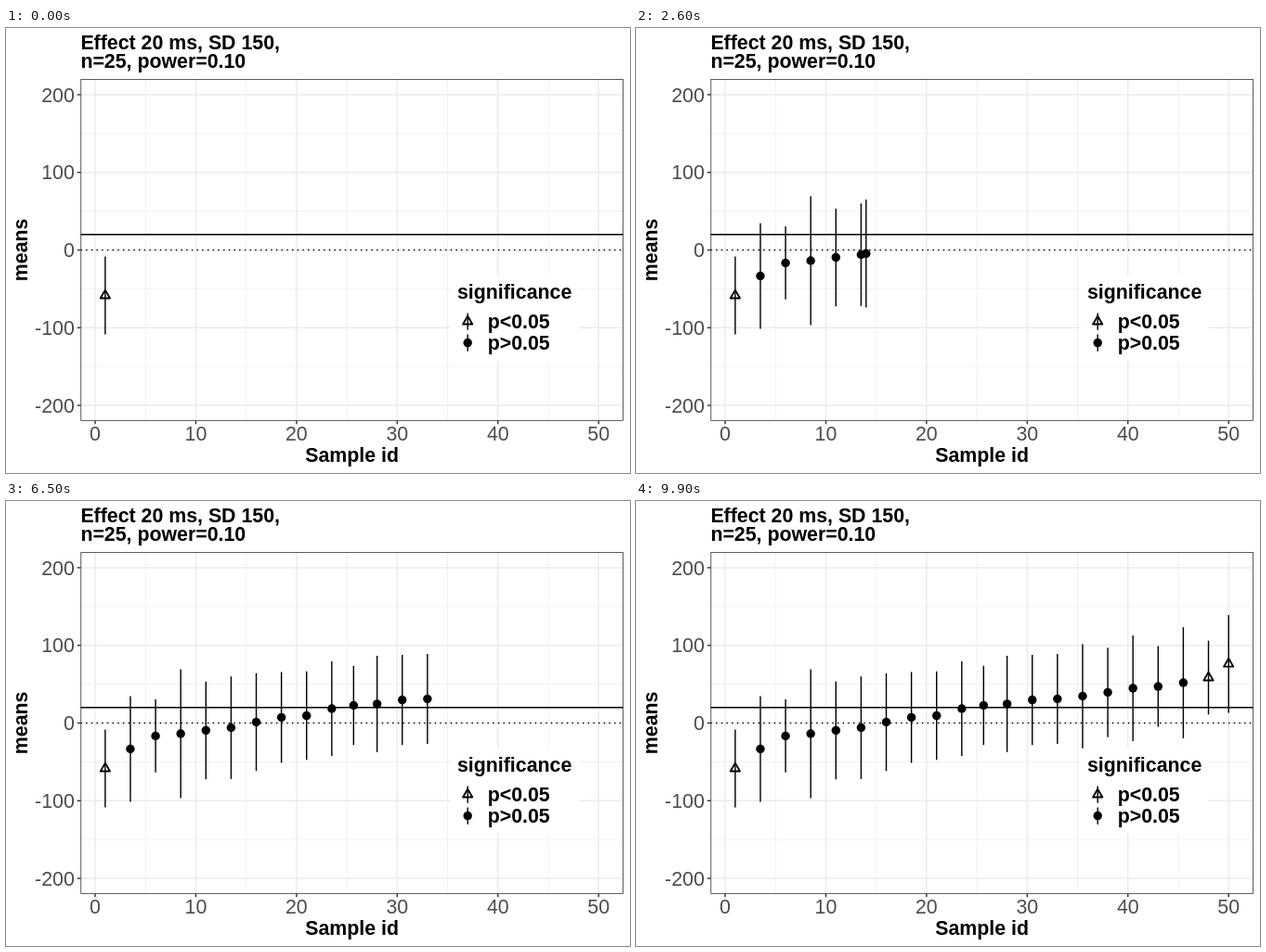
Recreate the animation shown at these times as an HTML page. Size 672 px wide and 480 px high, loop 10000 ms.

```html
<!DOCTYPE html>
<html lang="en">
<head>
<meta charset="utf-8">
<title>Sample means</title>
<style>
html, body { margin: 0; width: 672px; height: 480px; overflow: hidden; background: #fff; }
svg { display: block; }
text { font: 21.33px "Liberation Sans", Arial, sans-serif; fill: #4d4d4d; }
.b { font-weight: bold; fill: #000; }
.mark { stroke: #000; stroke-width: 1.42; }
.tri { fill: none; stroke: #000; stroke-width: 1.89; stroke-linejoin: round; }
</style>
</head>
<body>
<svg width="672" height="480" viewBox="0 0 672 480">
  <g id="axes"></g>
  <g id="marks"></g>
  <g id="legend"></g>
</svg>
<script>
const L = 80.4, R = 664.9, T = 55.1, B = 423.7;
const SCALE = 0.8378;
const X = id => 96 + 10.844 * id;
const Y = v => 239.5 - SCALE * v;
const $ = id => document.getElementById(id);

// [mean, half interval] of the marks that stay, one every STRIDE steps
const STRIDE = 5;
const keys = [
  [-58.5, 50], [-33.4, 68], [-16.7, 47], [-13.7, 83], [-9.5, 63], [-6, 66], [1.2, 63],
  [7.2, 58.5], [9.5, 57], [18.5, 61], [22.7, 51], [24.6, 62], [29.8, 58], [31, 58],
  [34.6, 67], [39.4, 57.5], [44.8, 68], [47.1, 52], [51.9, 71.5], [58.5, 47.5], [80.6, 61.7]];

const line = (x1, y1, x2, y2, color, width, extra = "") =>
  `<path d="M${x1} ${y1}L${x2} ${y2}" stroke="${color}" stroke-width="${width}" ${extra}/>`;
const text = (x, y, s, anchor = "start", cls = "b") =>
  `<text x="${x}" y="${Math.round(y)}" text-anchor="${anchor}" class="${cls}">${s}</text>`;

function mark(x, y, r, significant) {
  const point = significant
    ? `<path class="tri" d="M${x} ${y - 5.89}l5.1 8.84h-10.2z"/>`
    : `<circle cx="${x}" cy="${y}" r="4.73"/>`;
  return `<path class="mark" d="M${x} ${y - r}V${y + r}"/>` + point;
}

function drawAxes() {
  let s = "";
  const vert = (v, w) => line(X(v), T, X(v), B, "#ebebeb", w);
  const horiz = (v, w) => line(L, Y(v), R, Y(v), "#ebebeb", w);
  for (let v = 5; v < 50; v += 10) s += vert(v, 0.71);
  for (let v = -150; v < 200; v += 100) s += horiz(v, 0.71);
  for (let v = 0; v <= 50; v += 10) {
    s += vert(v, 1.42) + line(X(v), B, X(v), B + 3.67, "#333", 1.42) +
      text(X(v), 445, v, "middle", "");
  }
  for (let v = -200; v <= 200; v += 100) {
    s += horiz(v, 1.42) + line(L - 3.67, Y(v), L, Y(v), "#333", 1.42) +
      text(73.8, Y(v) + 7.6, v, "end", "");
  }
  s += line(L, Y(20), R, Y(20), "#000", 1.42);
  s += line(L, Y(0), R, Y(0), "#000", 1.42, 'stroke-dasharray="1.42 4.27"');
  s += `<rect x="${L + 0.35}" y="${T + 0.35}" width="${R - L - 0.7}" height="${B - T - 0.7}"
    fill="none" stroke="#333" stroke-width=".8"/>`;
  s += text(80.4, 23, "Effect 20 ms, SD 150,") + text(80.4, 43, "n=25, power=0.10");
  s += text(372.6, 468, "Sample id", "middle");
  s += `<g transform="translate(23 239.4) rotate(-90)">${text(0, 0, "means", "middle")}</g>`;
  $("axes").innerHTML = s;
}

function drawLegend() {
  $("legend").innerHTML =
    `<rect x="478.7" y="267" width="138" height="91" fill="#fff"/>` +
    text(486, 292, "significance") +
    mark(497.2, 316.6, 9.2, true) + text(518.7, 324, "p&lt;0.05") +
    mark(497.2, 339.6, 9.2, false) + text(518.7, 347, "p&gt;0.05");
}

// Two steps per sample, three between samples 25 and 26
function sampleAt(step) {
  if (step <= 48) return 1 + step / 2;
  if (step >= 51) return (step + 1) / 2;
  return 25 + (step - 48) / 3;
}

function markAt(step) {
  const k = Math.floor(step / STRIDE), t = step / STRIDE - k;
  const mix = n => keys[k][n] + (keys[k + 1][n] - keys[k][n]) * t;
  // Intervals between the lasting marks run a little wider
  const mean = mix(0), half = mix(1) + 12 * Math.sin(Math.PI * t) ** 2;
  return mark(X(sampleAt(step)), Y(mean), half * SCALE, Math.abs(mean) > half);
}

let shown = -1;
const start = performance.now();
function tick() {
  const step = Math.floor((performance.now() - start) / 100) % 100;
  if (step !== shown) {
    let s = "";
    for (let past = 0; past < step; past += STRIDE) s += markAt(past);
    $("marks").innerHTML = s + markAt(step);
    shown = step;
  }
  requestAnimationFrame(tick);
}

drawAxes();
drawLegend();
tick();
</script>
</body>
</html>
```
